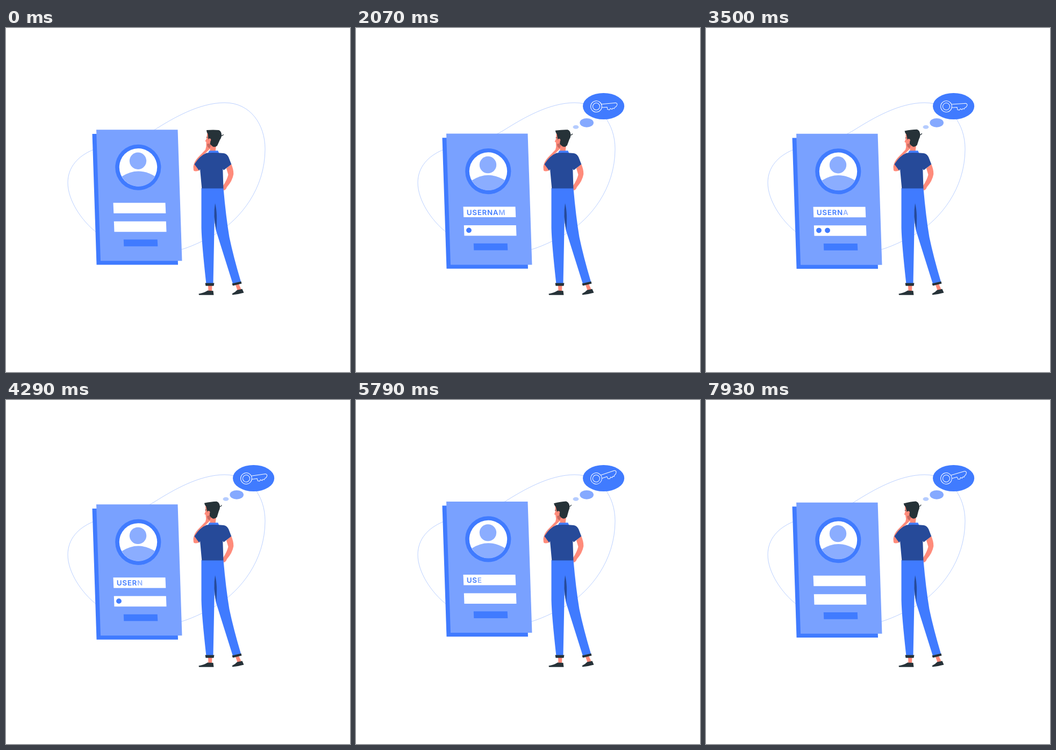
Recreate the animation shown at these times as an HTML page. Size 640 by 640 pixels, loop 8000 ms.

```html
<!DOCTYPE html>
<html lang="en">
<head>
<meta charset="utf-8">
<title>Login card</title>
<style>
html, body { margin: 0; width: 100%; height: 100%; overflow: hidden; background: #fff; }
svg { display: block; width: 100vw; height: 100vh; }
.blue { fill: #407bff; }
.navy { fill: #264a99; }
.skin { fill: #ff8b7b; }
.dark { fill: #263238; }
.pale { fill: #8badff; }
.white { fill: #fff; }
.line { fill: none; stroke: #fff; stroke-width: 1; stroke-linejoin: round; }
text { font: 600 13.3px Inter, "Open Sans", sans-serif; letter-spacing: .75px; }
</style>
</head>
<body>
<svg viewBox="0 0 640 640">
  <path fill="none" stroke="#407bff" stroke-width=".6" stroke-opacity=".6" d="M115 288C115 258 135 238 161 227C205 215 240 212 277 189C312 167 360 139 407 139C455 139 482 180 482 225C482 300 435 355 395 380C380 390 350 405 327 412C290 425 220 425 168 380C140 358 115 320 115 288Z"/>

  <g id="card">
    <path class="blue" d="M160.5 196.700H312L320 440.300H168.500Z"/>
    <path fill="#79a1ff" d="M168 189H319.500L327.500 433H176Z"/>
    <circle class="blue" cx="245.800" cy="259" r="42.600"/>
    <circle class="white" cx="246" cy="259" r="35.200"/>
    <circle class="pale" cx="245.500" cy="247" r="15.700"/>
    <path class="pale" d="M215.500 276Q246 256.500 277.500 276A35.200 35.200 0 0 1 215.500 276Z"/>
    <path class="white" d="M199.500 325H296.500L297.300 344.500H200.300Z"/>
    <path class="white" d="M200.800 359.500H297.800L298.500 379H201.500Z"/>
    <path class="blue" d="M218.800 393.300H281.700L282.300 406H219.300Z"/>
    <text id="word" class="blue" transform="translate(206 340) skewX(1.900)"></text>
    <g id="dots" class="blue"></g>
  </g>

  <g id="bubbles">
    <ellipse cx="409" cy="184.200" rx="5.400" ry="3.500" fill="#b5ccff"/>
    <ellipse cx="429.200" cy="176.300" rx="12.800" ry="8.400" fill="#85a9ff"/>
    <g>
      <ellipse class="blue" cx="460.600" cy="145.500" rx="38.600" ry="24.500"/>
      <g id="key" class="line">
        <circle r="10.400"/>
        <circle r="6.500"/>
        <path d="M10 -3.300H36.500Q39.500 -2.500 39 .5L37 3.500 34 5 33 7 30.500 6 28.500 8 26 6 24 8.500 20.500 7.500 20 3H10"/>
      </g>
    </g>
  </g>

  <g id="man">
    <path class="skin" d="M376 478H383.500L383 490H376.500Z"/>
    <path class="skin" d="M427 478L433 476 438 487 431 489Z"/>
    <path class="dark" d="M358.500 494.500Q368 493 375 488.500L385.500 489 386.500 496.700H359Z"/>
    <path class="dark" d="M420.500 494.500Q427 491 430 487.500L439.500 485.500 442.500 492.500Q432 495.500 421.500 496.500Z"/>
    <path class="skin" d="M410 261L419 253Q423.500 263 423.300 272Q421 285 411 296Q409 302 404 302L403.500 294Q411 283 413.500 273Z"/>
    <path class="blue" d="M363.500 298H404.500Q409 350 415.500 389Q423 425 437 472L422 476Q398 400 390.500 376Q388 362 388 350L385.500 476H372.500Q364 400 363.500 372Z"/>
    <path class="navy" d="M389 326Q394 345 391 376Q385 350 389 326Z"/>
    <path class="dark" d="M370.500 474.500H387.500L386.500 479.700H371.500Z"/>
    <path class="dark" d="M420.500 475.500L437.500 471.500 438.500 475.500 422 479.500Z"/>
    <path class="skin" d="M379.500 218H391L389.500 231H379.500Z"/>
    <g id="head">
      <path class="skin" d="M374.500 195L373 206 370.500 210.500 372.500 212V219Q374 224 379 223L386 220 384 196Z"/>
      <path class="dark" d="M373 190Q386 189 396 190Q400.500 192 401 198Q401.500 203 398 208L393 219Q388 223 384 220L379.500 216 381 207Q378 206 376.500 209L375.500 197Q373 194 373 190Z"/>
      <path d="M399 200Q404 201 404.300 197.800" fill="none" stroke="#263238" stroke-width="1.300"/>
      <path d="M373 203.500L375 203" stroke="#263238"/>
      <circle class="skin" cx="378.800" cy="208" r="2.500"/>
    </g>
    <path class="skin" d="M348.500 259Q349 250 357 241L371 226.500 373 218Q377 213 381 218L380 224Q370 234 366 238L359 265Q352 268 349 265Z"/>
    <path d="M374 216Q379 213 381 219L379 224Q374 222 374 216Z" fill="#c96a60"/>
    <path class="blue" d="M378 228.300H394.500L396.500 233.500H375.500Z"/>
    <path class="navy" d="M373 232.500Q388 231.500 405 233Q411 234 414 240L419.300 253.500 405 264.500 403.300 262 404.500 298.500H364.300L361 262.500 359.500 265.500 350.500 253.500Q360 238 373 232.500Z"/>
  </g>
</svg>
<script>
const LOOP = 8000, SWAY = 7500;
const NS = "http://www.w3.org/2000/svg";
const get = id => document.getElementById(id);
const clamp = v => Math.max(0, Math.min(1, v));
const wave = (t, peak) => Math.cos((t - peak) / SWAY * 2 * Math.PI);

function add(parent, tag, attrs, text = "") {
  const el = document.createElementNS(NS, tag);
  for (const name in attrs) el.setAttribute(name, attrs[name]);
  el.textContent = text;
  return parent.appendChild(el);
}

const letters = [..."USERNAME"].map(c => add(get("word"), "tspan", {}, c));
const dots = [0, 1, 2].map(i => add(get("dots"), "circle", { cx: 210 + 16 * i, cy: 368.8, r: 4.9 }));
const bubbles = [...get("bubbles").children];

// start and end are the midpoints of the two fades
const fadeIn = (t, start) => clamp((t - start) / 240 + .5);
const shown = (t, start, end) => Math.min(fadeIn(t, start), clamp((end - t) / 750 + .5));

function draw(t) {
  get("card").setAttribute("transform", `translate(0 ${3.7 + 4.8 * wave(t, 2830)})`);
  get("key").setAttribute("transform", `translate(447 146) rotate(${-12 + 9 * wave(t, 2950)})`);
  get("head").setAttribute("transform", `rotate(${-10 * Math.sin(t / LOOP * Math.PI / 2)} 384 222)`);
  letters.forEach((el, i) => el.setAttribute("fill-opacity", shown(t, 130 + 318 * i, 7500 - 790 * i)));
  dots.forEach((el, i) => el.setAttribute("opacity", shown(t, 1850 + 500 * i, 4650 - 780 * i)));
  bubbles.forEach((el, i) => el.setAttribute("opacity", fadeIn(t, 500 + 450 * i)));
}

const begin = performance.now();
function tick() {
  draw((performance.now() - begin) % LOOP);
  requestAnimationFrame(tick);
}
tick();
</script>
</body>
</html>
```
